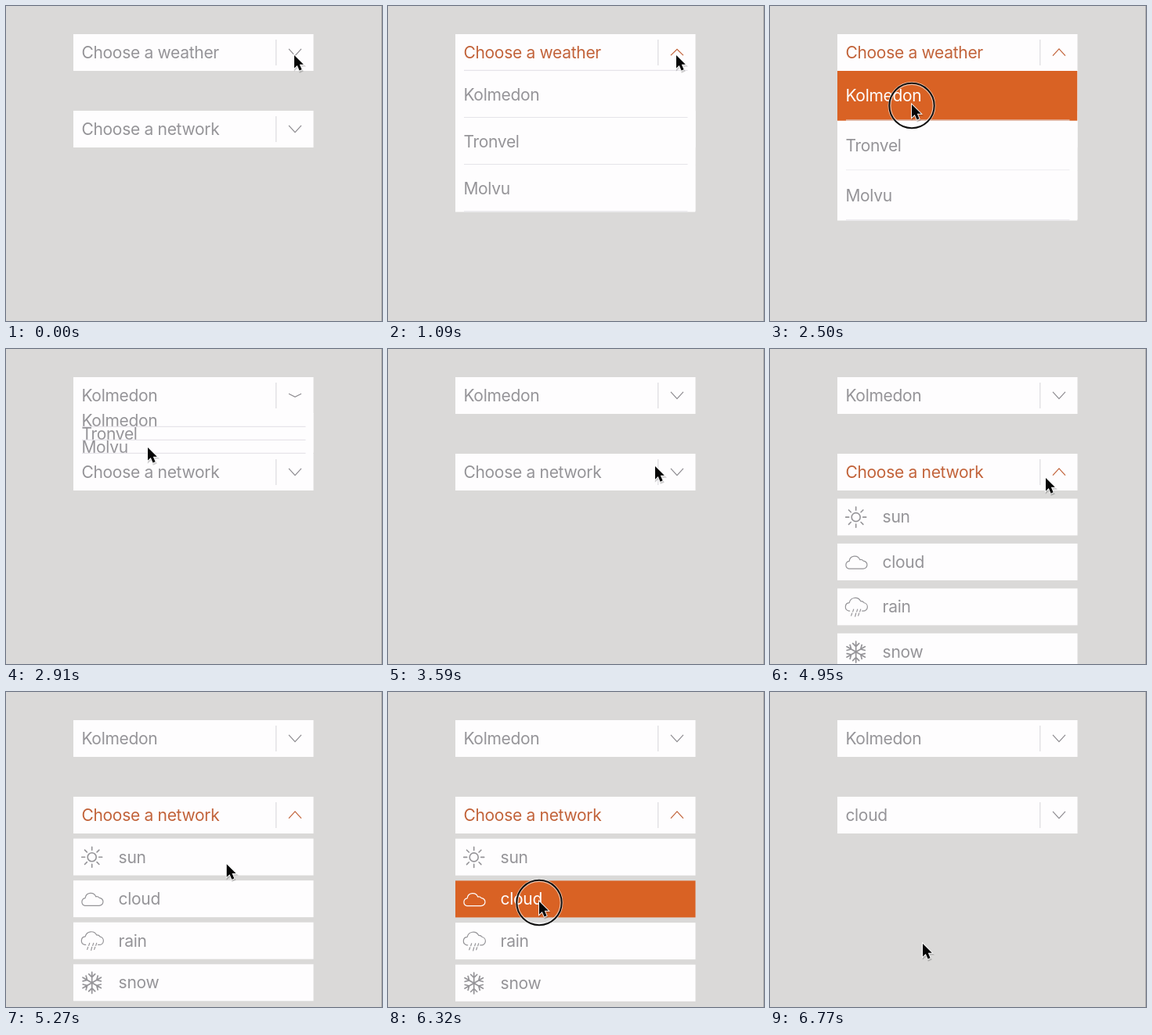
An HTML page for the animation above (6.81 s loop, 480 by 403 pixels).

```html
<!DOCTYPE html>
<html lang="en">
<head>
<meta charset="utf-8">
<title>Dropdown demo</title>
<style>
  html, body { margin: 0; width: 100%; height: 100%; overflow: hidden; background: #dad9d8; }
  #stage { display: block; width: 100vw; height: 100vh; }
  text { font: 400 21px Inter, Roboto, "Liberation Sans", sans-serif; letter-spacing: -.3px; }
</style>
</head>
<body>
<svg id="stage" viewBox="0 0 480 403"></svg>
<script>
const LOOP = 6810;
const GRAY = '#959498', ORANGE_TEXT = '#c2633a', ORANGE = '#d96224', WHITE = '#fefdfe', LINE = '#e6e4e9';
const LEFT = 86, WIDTH = 306.5, HEAD = 47, ROW = 63.8, STEP = 53.7;
const stage = document.getElementById('stage');

function add(parent, tag, attrs = {}, text) {
  const el = document.createElementNS('http://www.w3.org/2000/svg', tag);
  set(el, attrs);
  if (text) el.textContent = text;
  parent.appendChild(el);
  return el;
}
function set(el, attrs) {
  for (const key in attrs) el.setAttribute(key, attrs[key]);
}
const show = (el, on) => set(el, { visibility: on ? 'visible' : 'hidden' });
const clamp = v => Math.min(1, Math.max(0, v));
const easeOut = v => 1 - (1 - clamp(v)) ** 3;
function spring(ms) {
  const t = Math.max(0, ms) / 1000, a = 11, b = 13;
  return 1 - Math.exp(-a * t) * (Math.cos(b * t) + a / b * Math.sin(b * t));
}

// Icons are drawn around 0,0
const spokes = (count, spoke) => Array.from({ length: count }, (_, i) => {
  const a = i * 2 * Math.PI / count, c = Math.cos(a), s = Math.sin(a);
  return spoke.map(([x, y], k) => `${k % 2 ? 'L' : 'M'}${(x * c - y * s).toFixed(2)} ${(x * s + y * c).toFixed(2)}`).join('');
}).join('');
const CLOUD = 'M-9 8.5H9A5 5 0 0 0 9.5 -1.5A4.5 4.5 0 0 0 5 -3A7 7 0 0 0 -8.5 -1.3A5 5 0 0 0 -9 8.5Z';
const OPEN_CLOUD = 'M-8 5H-9A5.3 5.3 0 0 1 -8.5 -5.5A7.8 7.8 0 0 1 6 -7.5A5 5 0 0 1 10.5 -5.3A5.2 5.2 0 0 1 9.5 5H8';
const icons = {
  sun: { d: 'M-5.5 0A5.5 5.5 0 1 1 5.5 0A5.5 5.5 0 1 1 -5.5 0' + spokes(8, [[9, 0], [13, 0]]), w: 1.6 },
  cloud: { d: CLOUD, w: 1.2 },
  rain: { d: OPEN_CLOUD + 'M-3 3L-4 6M2 3L1 6M6 3L5 6M-5 8L-6 11M0 8L-1 12M4 8L3 11', w: 1.2 },
  snow: { d: spokes(6, [[0, 0], [0, -13.5], [0, -7], [4, -11], [0, -7], [-4, -11]]), w: 1.7 }
};

function header(parent, y) {
  add(parent, 'rect', { x: LEFT, y, width: WIDTH, height: HEAD, fill: WHITE });
  add(parent, 'path', { d: `M344.8 ${y + 7}v33`, stroke: '#dfdde2', 'stroke-width': 1.3 });
  const label = add(parent, 'text', { x: 96.4, y: y + 31 });
  const chevron = add(parent, 'path', { fill: 'none', 'stroke-width': 1.2 });
  return (text, active, open) => {
    label.textContent = text;
    set(label, { fill: active ? ORANGE_TEXT : GRAY });
    const mid = y + 23.3, h = 4.4 * (1 - 2 * open);
    set(chevron, { d: `M361 ${mid - h}L369 ${mid + h}L377 ${mid - h}`, stroke: active ? ORANGE_TEXT : '#8d8b90' });
  };
}

// Lower dropdown: cards fan out from behind its header
const cardLayer = add(stage, 'g');
const cards = ['sun', 'cloud', 'rain', 'snow'].map((name, i) => ({ name, i })).reverse().map(({ name, i }) => {
  const g = add(cardLayer, 'g');
  const box = add(g, 'rect', { x: LEFT, width: WIDTH, height: HEAD });
  const icon = add(g, 'path', {
    d: icons[name].d, transform: 'translate(109.7 23.7)', fill: 'none',
    'stroke-width': icons[name].w, 'stroke-linecap': 'round', 'stroke-linejoin': 'round'
  });
  const label = add(g, 'text', { x: 143.6, y: 31 }, name);
  return (open, hot) => {
    set(g, { transform: `translate(0 ${134 + STEP * (i + 1) * open})` });
    set(box, { fill: hot ? ORANGE : WHITE });
    set(icon, { stroke: hot ? WHITE : GRAY });
    set(label, { fill: hot ? WHITE : GRAY });
  };
}).reverse();
const lowerHeader = header(stage, 134);

// Upper dropdown: rows grow in height below its header
const rowLayer = add(stage, 'g');
const rowBack = add(rowLayer, 'rect', { x: LEFT, y: 82, width: WIDTH, fill: WHITE });
const rows = ['Kolmedon', 'Tronvel', 'Molvu'].map((name, i) => {
  const view = add(rowLayer, 'svg', { x: LEFT, width: WIDTH });
  const box = add(view, 'rect', { width: WIDTH, height: 80 });
  const label = add(view, 'text', { x: 10.4 }, name);
  const line = add(view, 'path', { stroke: LINE, 'stroke-width': 1.2 });
  return (open, hot) => {
    const h = ROW * open;
    set(view, { y: 83 + h * i, height: h });
    set(box, { fill: hot ? ORANGE : WHITE });
    set(label, { y: h / 2 + 7.5, fill: hot ? WHITE : GRAY });
    set(line, { d: `M11 ${h - .6}H296.5` });
  };
});
const upperHeader = header(stage, 36);
const headLine = add(stage, 'path', { d: 'M97 82.4H382.5', stroke: LINE, 'stroke-width': 1.2 });

add(stage, 'rect', { x: 479, width: 1, height: 403, fill: '#adacac' });

const pointer = add(stage, 'g');
const ring = add(pointer, 'g', { fill: 'none', transform: 'translate(0 1.5)' });
add(ring, 'circle', { r: 28.5, stroke: '#fff', 'stroke-width': 4, 'stroke-opacity': .6 });
add(ring, 'circle', { r: 28.7, stroke: '#111', 'stroke-width': 2 });
const ARROW = 'M0 0V16.6L3.8 13L6.6 19.6L9.6 18.3L6.8 11.8H11.8Z';
add(pointer, 'path', { d: ARROW, transform: 'translate(.8 1.8)', stroke: '#000', 'stroke-width': 2, opacity: .18 });
add(pointer, 'path', { d: ARROW, fill: '#060606', stroke: '#fff', 'stroke-width': 1.8, 'paint-order': 'stroke' });

const path = [
  [0, 368, 63], [1320, 368, 63], [1700, 300, 130], [1850, 270, 136], [2000, 245, 129], [2180, 181, 126],
  [3230, 181, 126], [3590, 341, 150], [3860, 349, 157], [4230, 349, 157], [4400, 361, 158],
  [4910, 361, 158], [5270, 282, 220], [5590, 193, 268], [6600, 193, 268], [6725, 194, 294],
  [6770, 195, 322], [LOOP, 195, 322]
];
const presses = [[590, 870], [2500, 2780], [4400, 4680], [6050, 6330]];
const UPPER = { open: 900, press: 2500, close: 2800 };
const LOWER = { open: 4706, press: 6050, close: 6350 };

function pointerAt(t) {
  const i = Math.max(1, path.findIndex(p => p[0] > t));
  const [t0, x0, y0] = path[i - 1], [t1, x1, y1] = path[i];
  const k = (t - t0) / (t1 - t0);
  return [x0 + (x1 - x0) * k, y0 + (y1 - y0) * k];
}

function draw(t) {
  const upActive = t >= UPPER.open && t < UPPER.close;
  const up = t < UPPER.close ? easeOut((t - UPPER.open) / 311) : 1 - easeOut((t - UPPER.close) / 311);
  upperHeader(t < UPPER.close ? 'Choose a weather' : 'Kolmedon', upActive, up);
  set(rowBack, { height: 3 * ROW * up });
  rows.forEach((row, i) => row(up, i === 0 && upActive && t >= UPPER.press));
  show(rowLayer, up > .001);
  show(headLine, up > .05 && t < UPPER.press);

  const lowActive = t >= LOWER.open && t < LOWER.close;
  const low = t < LOWER.close ? spring(t - LOWER.open) : 1 - easeOut((t - LOWER.close) / 311);
  lowerHeader(t < LOWER.close ? 'Choose a network' : 'cloud', lowActive, clamp(low));
  cards.forEach((card, i) => card(low, i === 1 && lowActive && t >= LOWER.press));
  show(cardLayer, low > .001);

  set(pointer, { transform: `translate(${pointerAt(t)})` });
  show(ring, presses.some(([down, release]) => t >= down && t < release));
}

const start = performance.now();
function tick() {
  draw((performance.now() - start) % LOOP);
  requestAnimationFrame(tick);
}
tick();
</script>
</body>
</html>
```
